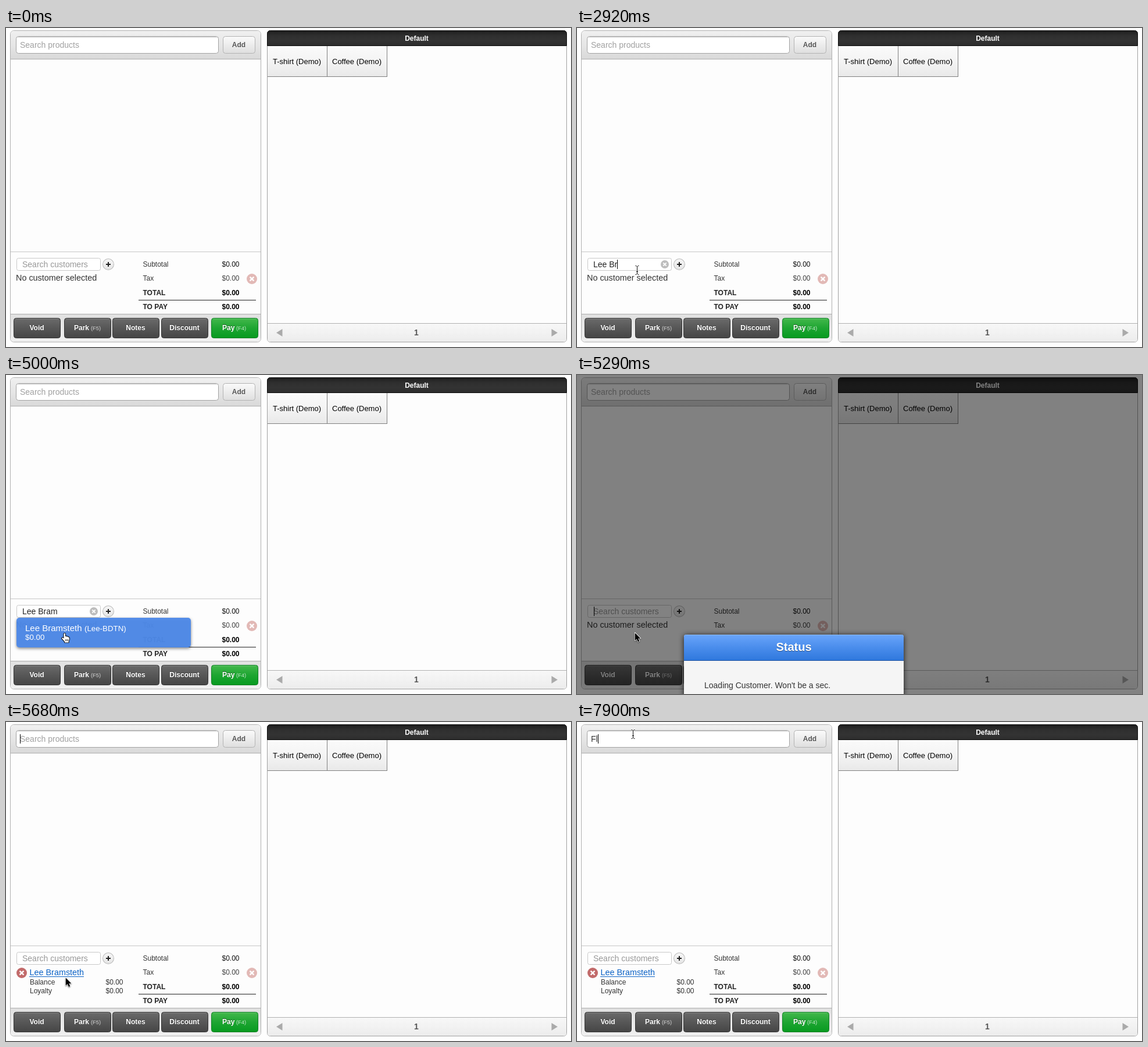
These frames come from a looping animation (972 by 548 pixels, 8000 ms). An HTML page with a canvas:

```html
<!DOCTYPE html>
<html lang="en">
<head>
<meta charset="utf-8">
<title>Register</title>
<style>
html, body { margin: 0; width: 100%; height: 100%; overflow: hidden; background: #fefefe; }
canvas { display: block; }
</style>
</head>
<body>
<canvas id="stage" width="972" height="548"></canvas>
<script>
const ctx = document.getElementById('stage').getContext('2d');
const FONT = '"Liberation Sans", Arial, sans-serif';
const LOOP = 8000;
const NAME = 'Lee Bramsteth';
const CODE = '(Lee-BDTN)';

// Times at which one more letter is in the field
const CUSTOMER_KEYS = [2210, 2390, 2480, 2570, 2750, 2920, 3340, 3580];
const PRODUCT_KEYS = [7790, 7900];
const OPEN = 3640, PICK = 5290, LOADED = 5680;

// Pointer moves: start, end, steps, Bezier points
const MOVES = [
  [170, 170, 1, [[110, 514]]],
  [320, 1010, 13, [[110, 514], [76, 409]]],
  [1550, 1550, 1, [[93.5, 415]]],
  [1610, 1610, 1, [[103.5, 416]]],
  [4420, 4700, 6, [[103.5, 416], [101, 445]]],
  [PICK, PICK, 1, [[99, 442]]],
  [5530, 5530, 1, [[102, 438.5]]],
  [5747, 6480, 12, [[102, 438.5], [260, 340], [180, 140], [121, 1]]],
  [6540, 6710, 4, [[121, 1], [96.5, 21]]]
];

function gradient(y0, y1, ...colors) {
  const g = ctx.createLinearGradient(0, y0, 0, y1);
  colors.forEach((c, i) => g.addColorStop(i / (colors.length - 1), c));
  return g;
}

function rounded(x, y, w, h, r) {
  ctx.beginPath();
  ctx.roundRect(x, y, w, h, r);
}

// Filled box with a one pixel border inside its bounds
function box(x, y, w, h, r, fill, border) {
  rounded(x + 0.5, y + 0.5, w - 1, h - 1, r);
  ctx.fillStyle = fill;
  ctx.fill();
  ctx.strokeStyle = border;
  ctx.lineWidth = 1;
  ctx.stroke();
}

function rect(x, y, w, h, fill) {
  ctx.fillStyle = fill;
  ctx.fillRect(x, y, w, h);
}

function setShadow(color, blur, dy) {
  ctx.shadowColor = color;
  ctx.shadowBlur = blur;
  ctx.shadowOffsetY = dy;
}

function text(str, x, y, size, color, { bold, align = 'left', shadow, dy = 1 } = {}) {
  ctx.save();
  ctx.font = `${bold ? 'bold ' : ''}${size}px ${FONT}`;
  ctx.textAlign = align;
  ctx.fillStyle = color;
  if (shadow) setShadow(shadow, 0, dy);
  ctx.fillText(str, x, y);
  ctx.restore();
}

function textWidth(str, size) {
  ctx.font = `${size}px ${FONT}`;
  return ctx.measureText(str).width;
}

function disc(x, y, r, fill) {
  ctx.beginPath();
  ctx.arc(x, y, r, 0, Math.PI * 2);
  ctx.fillStyle = fill;
  ctx.fill();
}

function crossIcon(x, y, r, fill) {
  disc(x, y, r, fill);
  const d = r * 0.38;
  ctx.beginPath();
  ctx.moveTo(x - d, y - d);
  ctx.lineTo(x + d, y + d);
  ctx.moveTo(x + d, y - d);
  ctx.lineTo(x - d, y + d);
  ctx.strokeStyle = '#fff';
  ctx.lineWidth = r * 0.27;
  ctx.stroke();
}

function triangle(x, y, dx) {
  ctx.beginPath();
  ctx.moveTo(x, y);
  ctx.lineTo(x - dx, y - 6.5);
  ctx.lineTo(x - dx, y + 6.5);
  ctx.fillStyle = '#aaa';
  ctx.fill();
}

function button(x, label, key, green) {
  const fill = green ? gradient(498, 533, '#45b94d', '#1ea532', '#069a1f')
                     : gradient(498, 533, '#6c6c6c', '#575757', '#454545');
  box(x, 498, 81, 35, 4, fill, green ? '#0c8022' : '#343434');
  rect(x + 4, 499, 73, 1, 'rgba(255,255,255,.18)');
  const style = { bold: true, shadow: 'rgba(0,0,0,.5)', dy: -1 };
  if (!key) return text(label, x + 40, 519, 12, '#fff', { ...style, align: 'center' });
  const left = x + (green ? 19 : 17);
  text(label, left, 519, 12, '#fff', style);
  text(key, left + (green ? 24 : 29), 519, 9.4, 'rgba(255,255,255,.75)');
}

function drawRegister() {
  box(7, 4, 432, 536, 6, '#fdfdfd', '#b0b0b0');
  rounded(8, 5, 430, 48, [5, 5, 0, 0]);
  ctx.fillStyle = gradient(5, 53, '#f0f0f0', '#e6e6e6', '#d9d9d9');
  ctx.fill();
  rect(8, 53, 430, 1, '#aeaeae');
  box(17, 14, 349, 30, 4, '#fff', '#a2a2a2');
  rect(19, 15, 345, 1, '#d2d2d2');
  rect(19, 16, 345, 1, '#eeeeee');
  box(373, 14, 56, 30, 4, gradient(14, 44, '#fbfbfb', '#dedede'), '#b3b3b3');
  text('Add', 400.5, 33, 12, '#555', { bold: true, align: 'center', shadow: '#fff' });

  rect(8, 384, 430, 1, '#c6c6c6');
  box(18, 395, 145, 22, 3, '#fff', '#c8c8c8');
  disc(176, 406, 10, '#b9b9b9');
  disc(176, 406, 9, gradient(396, 416, '#f8f8f8', '#e4e4e4'));
  rect(172, 405, 8, 2, '#222');
  rect(175, 402, 2, 8, '#222');

  rounded(8, 491, 430, 48, [0, 0, 5, 5]);
  ctx.fillStyle = gradient(491, 539, '#e0e0e0', '#f0f0f0');
  ctx.fill();
  rect(8, 491, 430, 1, '#adadad');
  button(13, 'Void');
  button(100, 'Park', '(F5)');
  button(183, 'Notes');
  button(267, 'Discount');
  button(353, 'Pay', '(F4)', true);

  const rows = [['Subtotal', 410, '#333', '#111'], ['Tax', 434, '#333', '#444'],
                ['TOTAL', 459, '#222', '#000', true], ['TO PAY', 483, '#222', '#000', true]];
  for (const [label, y, color, dark, bold] of rows) {
    text(label, 235.5, y, 12, color, { bold });
    text('$0.00', 401.5, y, 12, dark, { bold, align: 'right' });
  }
  rect(228, 467, 202, 1, '#222');
  crossIcon(423, 431, 9, '#e2b9b6');
}

function drawCatalog() {
  box(449, 4, 516, 536, 5, '#fdfdfd', '#a0a0a0');
  box(449, 4, 516, 27, [5, 5, 0, 0], gradient(4, 31, '#1c1c1c', '#2f2f2f', '#333', '#2c2c2c'), '#0c0c0c');
  text('Default', 706.5, 22, 12, '#fff', { bold: true, align: 'center' });
  [['T-shirt (Demo)', 450], ['Coffee (Demo)', 553]].forEach(([label, x]) => {
    rect(x, 31, 102, 52, gradient(31, 83, '#fafafa', '#f4f4f4', '#e9e9e9'));
    rect(x + 102, 31, 1, 53, '#808080');
    rect(x, 83, 102, 1, '#808080');
    text(label, x + 50.5, 62, 13, '#000', { align: 'center' });
  });
  rounded(450, 507, 514, 32, [0, 0, 4, 4]);
  ctx.fillStyle = gradient(507, 539, '#f8f8f8', '#ececec');
  ctx.fill();
  rect(450, 507, 514, 1, '#b0b0b0');
  triangle(465, 523.5, -10.5);
  triangle(949, 523.5, 10.5);
  text('1', 706, 528, 14, '#555', { bold: true, align: 'center' });
}

const typed = (keys, str, t) => str.slice(0, keys.filter(k => t >= k).length);

function drawFields(t) {
  const product = typed(PRODUCT_KEYS, 'Fl', t);
  text(product || 'Search products', 24, 34, 14, product ? '#333' : '#a0a0a0');
  if (t >= LOADED && !(t >= 7190 && t < 7670)) {
    rect(Math.round(24 + textWidth(product, 14)), 21, 1, 16, '#000');
  }

  const customer = t < PICK ? typed(CUSTOMER_KEYS, NAME, t) : '';
  text(customer || 'Search customers', 28, 411, 14, customer ? '#222' : '#979797');
  if (customer) crossIcon(151, 406, 7, '#bdbdbd');
  const caret = (t >= 1310 && t < 1850) || (t >= 2210 && t < 5000) || (t >= PICK && t < LOADED);
  if (caret) rect(Math.max(29, Math.round(28 + textWidth(customer, 14))), 398, 1, 16, '#000');
}

function drawCustomer(t) {
  if (t < LOADED) return text('No customer selected', 17, 434, 14.4, '#333');
  crossIcon(27, 431, 9, '#c26b6b');
  text(NAME, 40.5, 435, 14.4, '#0a62c6');
  rect(40, 437, Math.round(textWidth(NAME, 14.4)), 1, '#0a62c6');
  [['Balance', 451], ['Loyalty', 466]].forEach(([label, y]) => {
    text(label, 41, y, 12, '#333');
    text('$0.00', 201.5, y, 12, '#333', { align: 'right' });
  });
}

function drawSuggestion(hover) {
  ctx.save();
  setShadow('rgba(0,0,0,.5)', 5, 2);
  rounded(18, 417, 300, 51, 5);
  ctx.fillStyle = hover ? 'rgba(79,139,234,.95)' : 'rgba(255,255,255,.95)';
  ctx.fill();
  ctx.restore();
  const color = hover ? '#fff' : '#333';
  text(NAME, 33, 440, 15, color);
  text(CODE, 135, 440, 13.3, color);
  text('$0.00', 33, 455, 13.3, color);
}

function drawStatus() {
  rect(0, 0, 972, 548, 'rgba(0,0,0,.49)');
  ctx.save();
  setShadow('rgba(0,0,0,.8)', 10, 1);
  rounded(184, 446, 378, 140, 4);
  ctx.fillStyle = '#f5f5f5';
  ctx.fill();
  ctx.restore();
  rounded(184, 446, 378, 44, [4, 4, 0, 0]);
  ctx.fillStyle = gradient(446, 490, '#6aa5fa', '#4a8dec', '#2f78dd');
  ctx.fill();
  rect(188, 446, 370, 1, '#8bbafc');
  rect(184, 490, 378, 1, '#1d519f');
  text('Status', 373, 474, 20, '#fff', { bold: true, align: 'center', shadow: 'rgba(0,0,0,.4)' });
  text("Loading Customer. Won't be a sec.", 219, 538, 14, '#333');
}

function bezier(points, u) {
  while (points.length > 1) {
    points = points.slice(1).map((p, i) => p.map((v, j) => points[i][j] + (v - points[i][j]) * u));
  }
  return points[0];
}

function pointerAt(t) {
  const move = MOVES.filter(m => t >= m[0]).pop();
  if (!move) return null;
  const [start, end, steps, points] = move;
  const done = steps > 1 ? Math.floor((t - start) / (end - start) * (steps - 1) + 1e-6) + 1 : 1;
  const u = Math.min(1, done / steps);
  return bezier(points, u * u * (3 - 2 * u));
}

function pointerKind([x, y], t) {
  const over = (l, tp, r, b) => x >= l && x < r && y >= tp && y < b;
  if (t >= PICK && t < LOADED) return arrow;
  if (t >= OPEN && t < PICK && over(18, 417, 318, 468)) return hand;
  if (over(17, 14, 366, 44) || over(18, 395, 163, 417)) return beam;
  if (t < LOADED && over(18, 421, 157, 438)) return beam;
  if (t >= LOADED && over(40, 423, 134, 438)) return hand;
  if (over(13, 498, 433, 533)) return hand;
  return arrow;
}

function outline(path, fill, stroke, width) {
  ctx.lineJoin = 'round';
  ctx.lineWidth = width;
  ctx.strokeStyle = stroke;
  ctx.stroke(path);
  if (fill) {
    ctx.fillStyle = fill;
    ctx.fill(path);
  }
}

const ARROW = new Path2D('M.8 1V14L3.8 11.2 6 16.2 8.2 15.2 6 10.4H10.2Z');
const HAND = new Path2D('M4.5 9.5V2Q4.5.6 5.7.6 7 .6 7 2V6Q8.3 5.2 9.4 6.4 10.8 5.8 11.8 7.2 13.6 6.8 13.9 8.8V11Q13.6 13 12.7 14V16.4H6V15Q3.5 12.5 1 9.6 1.2 8 2.6 8.2Z');
const FINGERS = new Path2D('M7.6 11V14M9.6 11V14M11.6 11V14');
const BEAM = new Path2D('M-3-7.5H-1.5L0-6 1.5-7.5H3M0-6V6M-3 7.5H-1.5L0 6 1.5 7.5H3M-1.5 2.5H1.5');

function arrow(x, y) {
  ctx.translate(x, y);
  ctx.save();
  setShadow('rgba(0,0,0,.4)', 2, 1);
  outline(ARROW, '#000', '#fff', 1.8);
  ctx.restore();
}

function hand(x, y) {
  ctx.translate(x - 6, y - 2);
  outline(HAND, '#fff', '#000', 1.8);
  outline(FINGERS, null, '#000', 0.8);
}

function beam(x, y) {
  ctx.translate(x, y);
  outline(BEAM, null, 'rgba(255,255,255,.8)', 2.4);
  outline(BEAM, null, '#111', 1);
}

function draw(t) {
  const pointer = pointerAt(t);
  rect(0, 0, 972, 548, '#fefefe');
  drawRegister();
  drawCatalog();
  drawFields(t);
  drawCustomer(t);
  if (t >= OPEN && t < PICK) drawSuggestion(pointerKind(pointer, t) === hand);
  if (t >= PICK && t < LOADED) drawStatus();
  if (pointer) {
    ctx.save();
    pointerKind(pointer, t)(...pointer);
    ctx.restore();
  }
}

const start = performance.now();
function tick() {
  draw((performance.now() - start) % LOOP);
  requestAnimationFrame(tick);
}
tick();
</script>
</body>
</html>
```
